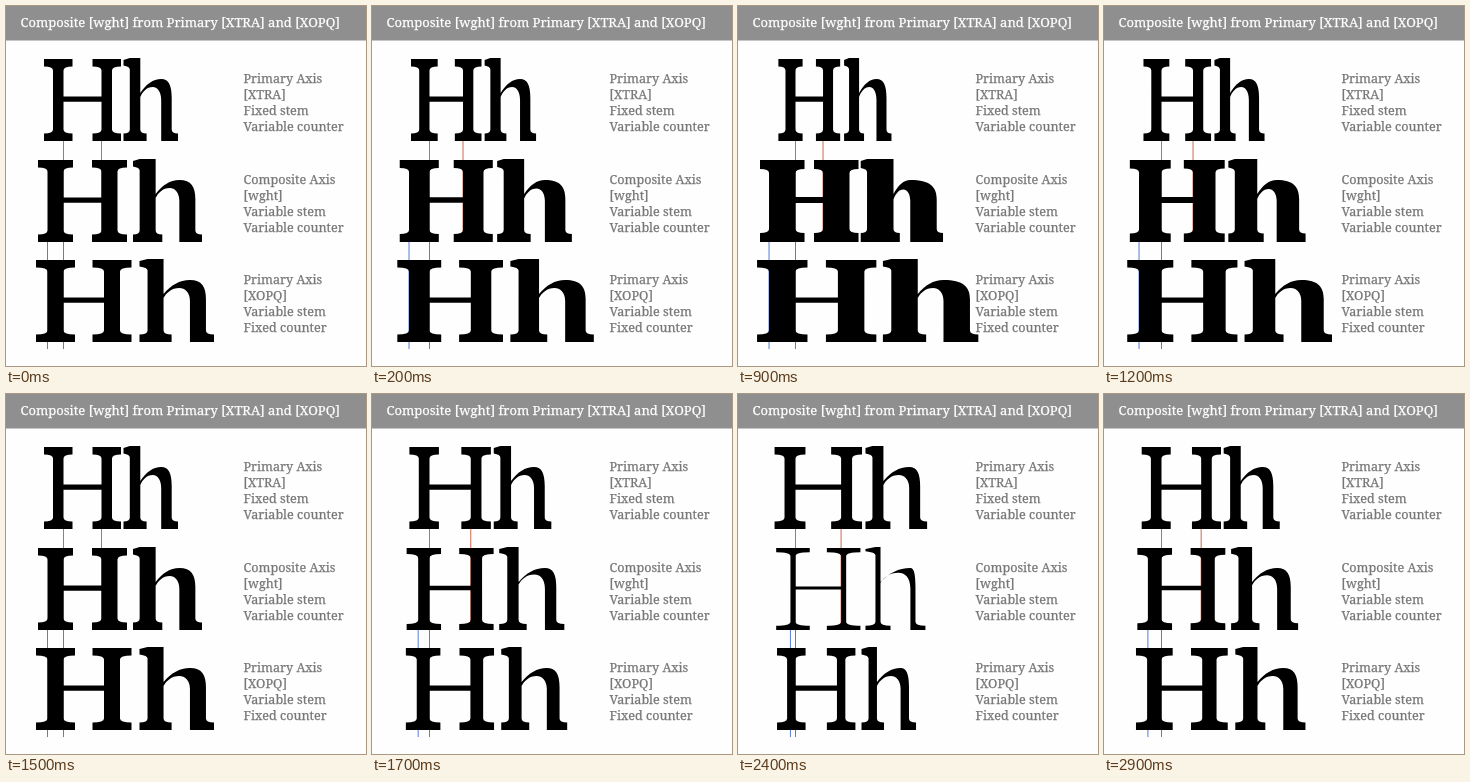
These frames come from a looping animation (360x360 px, 3 s). An HTML page:

```html
<!DOCTYPE html>
<html lang="en">
<head>
<meta charset="utf-8">
<title>Composite weight axis</title>
<style>
  html, body { margin: 0; width: 100%; height: 100%; overflow: hidden; background: #fefefe; }
  svg { display: block; width: 100vw; height: 100vh; }
  text { font-family: "Noto Serif", serif; font-size: 12.6px; fill: #777; stroke: #777; stroke-width: .25; }
  .title { font-size: 13px; fill: #fff; stroke: #fff; }
  .red { stroke: #d0694f; }
  .blue { stroke: #557cda; }
</style>
</head>
<body>
<svg viewBox="0 0 360 360">
  <rect width="360" height="34.5" fill="#8f8f8f"/>
  <text class="title" x="14.5" y="20.5">Composite [wght] from Primary [XTRA] and [XOPQ]</text>
  <g id="guides">
    <path class="red" d="M57.5 134V236"/>
    <path class="red" id="counterLine"/>
    <path class="blue" d="M57.5 236V343"/>
    <path class="blue" id="stemLine"/>
  </g>
  <g id="glyphs"></g>
  <g id="labels"></g>
</svg>
<script>
const NS = "http://www.w3.org/2000/svg";
const LOOP = 3000, STEP = 100;
const EDGE = 57.5;          // inner edge of the left stem, shared by all rows
const CAP = 82, ASC = 83, XH = 62;

// Each pose: stem, serif overhang, counter end, h start, h end, slab thickness.
// Poses are the low end, middle and high end of the axis.
const rows = [
  { base: 135, label: ["Primary Axis", "[XTRA]", "Fixed stem", "Variable counter"],
    poses: [[11, 10, 103.5, 128, 190, 7.5], [10.5, 9, 95.5, 117.5, 172, 7.5], [10, 7, 84.5, 105.5, 152.5, 7.5]] },
  { base: 236, label: ["Composite Axis", "[wght]", "Variable stem", "Variable counter"],
    poses: [[4.5, 14.5, 103.5, 127.5, 187, 4], [16, 9.5, 95.5, 127, 196, 7.5], [27, 9, 84.5, 122.5, 205.5, 9]] },
  { base: 336, label: ["Primary Axis", "[XOPQ]", "Variable stem", "Fixed counter"],
    poses: [[8, 10, 99, 123, 176.5, 7.5], [16, 11.5, 98, 133.5, 208, 7.5], [27, 12, 100, 145.5, 242, 7.5]] }
];

function add(parent, tag, attrs) {
  const el = document.createElementNS(NS, tag);
  for (const k in attrs) el.setAttribute(k, attrs[k]);
  return document.getElementById(parent).appendChild(el);
}

for (const row of rows) {
  row.path = add("glyphs", "path", {});
  row.label.forEach((line, i) => {
    add("labels", "text", { x: 237.5, y: row.base - 58 + 16 * i }).textContent = line;
  });
}

function poseAt(poses, v) {
  const end = poses[v < 0 ? 0 : 2], k = Math.abs(v);
  return poses[1].map((m, i) => m + (end[i] - m) * k);
}

// All parts run clockwise so that overlaps stay filled.
const box = (l, t, r, b) => `M${l} ${t}H${r}V${b}H${l}Z`;

function slab(l, r, y, left, right, t) {
  const inner = y - t, neck = inner - Math.sign(t) * 4;
  return `M${l - left} ${y}V${inner}Q${l} ${inner} ${l} ${neck}H${r}` +
    `Q${r} ${inner} ${r + right} ${inner}V${y}Z`;
}
const foot = (l, r, y, left, right, t) => slab(l, r, y, left, right, t);
const head = (l, r, y, o, t) => slab(r, l, y, -o, -o, -t);

function capH(base, s, o, end, t) {
  const top = base - CAP, mid = base - 42, half = t * 0.35;
  const stem = l => box(l, top, l + s, base) +
    foot(l, l + s, base, o, o, t) + head(l, l + s, top, o, t);
  return stem(EDGE - s) + stem(end) + box(EDGE - 1, mid - half, end + 1, mid + half);
}

function lowH(base, s, o, start, end, t) {
  const l = start + o, r = l + s;
  const x2 = end - o - s, x3 = x2 + s, c = x2 - r;
  const asc = base - ASC, top = base - XH, under = top + t + 0.5;
  const flag = `M${start} ${asc + 2}L${l} ${asc}V${asc + t + 4}Q${l} ${asc + t + 1} ${start} ${asc + t}Z`;
  const arch = `M${r} ${base - 48}C${r + c * 0.3} ${base - 57} ${r + c * 0.6} ${top} ${x2} ${top}` +
    `C${x2 + s * 0.75} ${top} ${x3} ${top + 7} ${x3} ${top + 19}V${base}H${x2}V${base - 41}` +
    `C${x2} ${under + 4} ${x2 - c * 0.2} ${under} ${x2 - c * 0.4} ${under}` +
    `C${r + c * 0.3} ${under} ${r + c * 0.1} ${under + 5} ${r} ${under + 10}Z`;
  return box(l, asc, r, base) + flag + arch +
    foot(l, r, base, o, o, t) + foot(x2, x3, base, 0, o, t);
}

function draw(v) {
  for (const row of rows) {
    const [s, o, end, start, stop, t] = poseAt(row.poses, v);
    row.path.setAttribute("d", capH(row.base, s, o, end, t) + lowH(row.base, s, o * 0.7, start, stop, t));
  }
  const [s, , end] = poseAt(rows[1].poses, v);
  counterLine.setAttribute("d", `M${end} 134V236`);
  stemLine.setAttribute("d", `M${EDGE - s} 236V343`);
}

const counterLine = document.getElementById("counterLine");
const stemLine = document.getElementById("stemLine");
const begin = performance.now();

function tick() {
  const t = Math.max(0, performance.now() - begin) % LOOP;
  draw(Math.sin(2 * Math.PI * Math.floor(t / STEP) * STEP / LOOP));
  requestAnimationFrame(tick);
}
tick();
</script>
</body>
</html>
```
